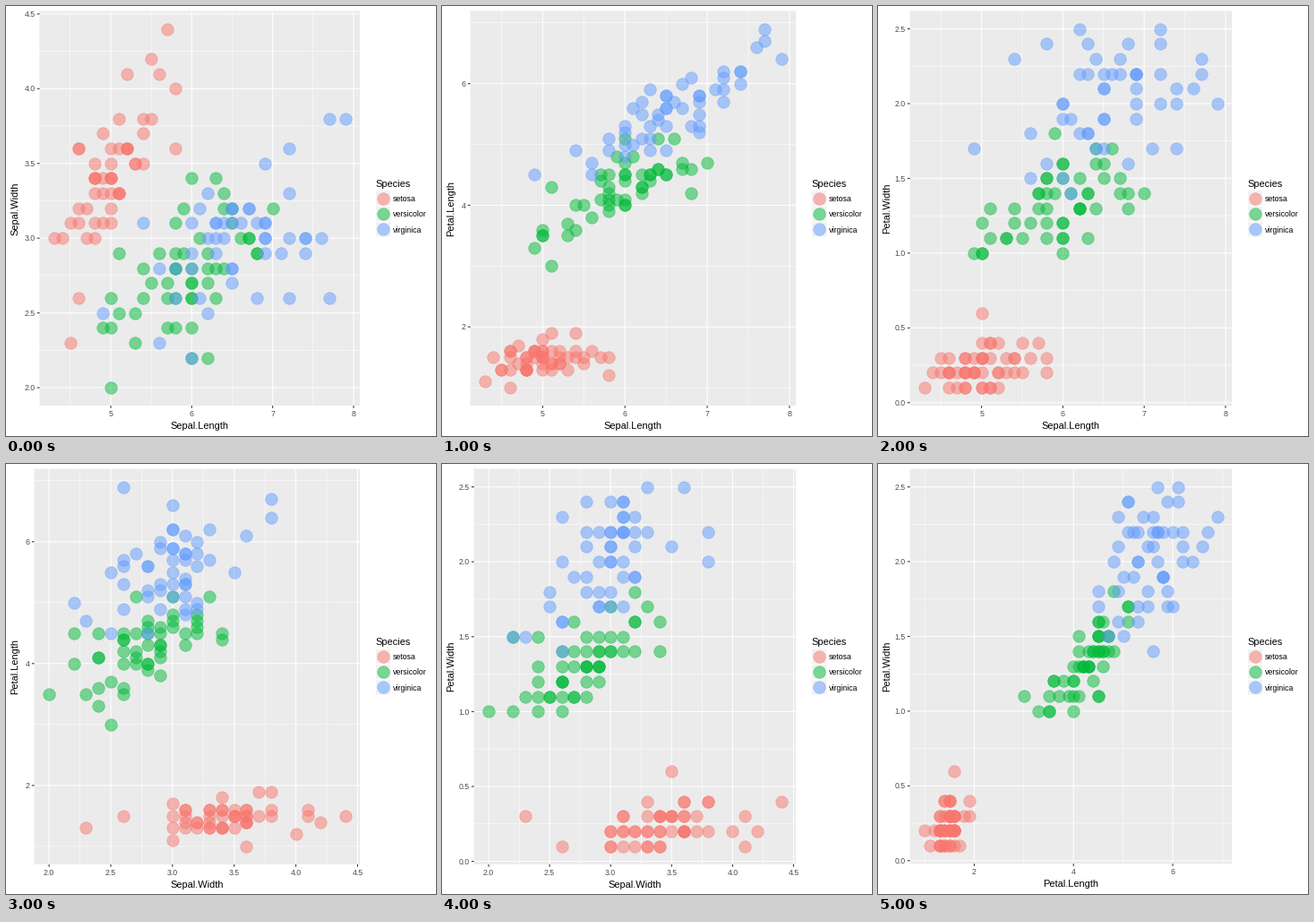
Write a matplotlib script that moves like this. It is 480x480 px and loops after 6 s.

```python
import itertools

import matplotlib.pyplot as plt
import numpy as np
from matplotlib.animation import FuncAnimation
from matplotlib.patches import Rectangle

plt.rcParams["font.family"] = "Liberation Sans"

SIZE, DPI = 480, 72
TOP, RIGHT = 5.5, 395.2
MAJOR, MINOR = 1.07, 0.54

# name, data minimum, data maximum, tick step
VARS = [
    ("Sepal.Length", 4.3, 7.9, 1),
    ("Sepal.Width", 2.0, 4.4, 0.5),
    ("Petal.Length", 1.0, 6.9, 2),
    ("Petal.Width", 0.1, 2.5, 0.5),
]
LEFT = {1: 37.5, 2: 31.6, 3: 35.7}  # panel edge, by the variable on y

# Mean, spread and correlations of each species, with its outlying flowers.
SPECIES = {
    "setosa": dict(
        color="#F8766D",
        mean=[5.006, 3.428, 1.462, 0.246],
        sd=[0.352, 0.379, 0.174, 0.105],
        corr=[0.743, 0.267, 0.278, 0.178, 0.233, 0.332],
        outer=[(5.7, 4.4, 1.5, 0.4), (5.5, 4.2, 1.4, 0.2), (5.2, 4.1, 1.5, 0.1),
               (5.8, 4.0, 1.2, 0.2), (4.5, 2.3, 1.3, 0.3), (4.3, 3.0, 1.1, 0.1),
               (4.6, 3.6, 1.0, 0.2), (5.0, 3.5, 1.6, 0.6), (5.1, 3.8, 1.9, 0.4)],
    ),
    "versicolor": dict(
        color="#00BA38",
        mean=[5.936, 2.770, 4.260, 1.326],
        sd=[0.516, 0.314, 0.470, 0.198],
        corr=[0.526, 0.754, 0.546, 0.561, 0.664, 0.787],
        outer=[(5.0, 2.0, 3.5, 1.0), (6.0, 2.2, 4.0, 1.0), (6.2, 2.2, 4.5, 1.5),
               (5.1, 2.5, 3.0, 1.1), (7.0, 3.2, 4.7, 1.4), (6.0, 3.4, 4.5, 1.6),
               (4.9, 2.4, 3.3, 1.0), (5.9, 3.2, 4.8, 1.8), (6.0, 2.7, 5.1, 1.6)],
    ),
    "virginica": dict(
        color="#619CFF",
        mean=[6.588, 2.974, 5.552, 2.026],
        sd=[0.636, 0.322, 0.552, 0.275],
        corr=[0.457, 0.864, 0.281, 0.401, 0.538, 0.322],
        outer=[(4.9, 2.5, 4.5, 1.7), (7.7, 3.8, 6.7, 2.2), (7.9, 3.8, 6.4, 2.0),
               (7.2, 3.6, 6.1, 2.5), (7.7, 2.6, 6.9, 2.3), (6.0, 2.2, 5.0, 1.5),
               (7.6, 3.0, 6.6, 2.1), (6.1, 2.6, 5.6, 1.4), (5.8, 2.8, 5.1, 2.4)],
    ),
}


def grow(rng, mean, sd, corr, outer, n=50, **_):
    """Fill up the outliers so that all n flowers have the given statistics."""
    mean, sd, outer = np.array(mean), np.array(sd), np.array(outer)
    cor = np.eye(4)
    for (a, b), c in zip(itertools.combinations(range(4), 2), corr):
        cor[a, b] = cor[b, a] = c
    cov = cor * np.outer(sd, sd)

    m = n - len(outer)
    center = (n * mean - outer.sum(axis=0)) / m
    scatter = ((n - 1) * cov + n * np.outer(mean, mean)
               - outer.T @ outer - m * np.outer(center, center))
    val, vec = np.linalg.eigh(scatter / m)
    root = vec * np.sqrt(np.maximum(val, 1e-4))

    z = rng.standard_normal((m, 4))
    z -= z.mean(axis=0)
    z = np.linalg.qr(z)[0] * np.sqrt(m)
    rest = np.clip(center + z @ root.T, outer.min(axis=0), outer.max(axis=0))
    return np.vstack([outer, rest.round(1)])


rng = np.random.default_rng(4)
flowers = {name: grow(rng, **spec) for name, spec in SPECIES.items()}
pairs = list(itertools.combinations(range(4), 2))

fig = plt.figure(figsize=(SIZE / DPI, SIZE / DPI), dpi=DPI, facecolor="white")
ax = fig.add_axes([0, 0, 1, 1])


def scale(var, start, end):
    """Map a variable to pixels, with 5% of room on both sides."""
    _, lo, hi, _ = VARS[var]
    pad = 0.05 * (hi - lo)
    return lambda v: start + (v - lo + pad) / (hi - lo + 2 * pad) * (end - start)


def breaks(var, offset=0.0):
    _, lo, hi, step = VARS[var]
    pad = 0.05 * (hi - lo)
    ticks = (np.arange(20) + offset) * step
    return [t for t in ticks if lo - pad <= t <= hi + pad]


def label(var, t):
    return f"{t:.1f}" if VARS[var][3] < 1 else f"{t:.0f}"


def line(xs, ys, color, width, z):
    ax.plot(xs, ys, color=color, lw=width, zorder=z, snap=False,
            solid_capstyle="butt")


def box(x, y, w, h, **style):
    ax.add_patch(Rectangle((x, y), w, h, snap=False, zorder=0, **style))


def text(x, y, s, size, color="black", ha="left", angle=0):
    ax.text(x, y, s, size=size, color=color, ha=ha, va="baseline",
            rotation=angle, rotation_mode="anchor")


def dots(x, y, color, z):
    ax.scatter(x, y, s=13.5 ** 2, c=color, edgecolors=color, lw=0.71,
               alpha=0.5, zorder=z)


def legend():
    text(412, 202, "Species", 11)
    for k, (name, spec) in enumerate(SPECIES.items()):
        y = 214.8 + 17.28 * k
        box(412.4, y - 8.64, 17.28, 17.28, fc="#F2F2F2", ec="white", lw=MAJOR)
        dots([421], [y], spec["color"], 5)
        text(432, y + 3.2, name, 8.8)


def draw(i):
    vx, vy = pairs[i]
    left = LEFT[vy]
    drop = 1 if vx == 1 else 0
    bottom = 446.1 + 0.8 * drop
    px, py = scale(vx, left, RIGHT), scale(vy, bottom, TOP)

    ax.cla()
    ax.set(xlim=(0, SIZE), ylim=(SIZE, 0))
    ax.axis("off")
    box(left, TOP, RIGHT - left, bottom - TOP, fc="#EBEBEB", ec="none")

    for offset, width in ((0.5, MINOR), (0, MAJOR)):
        for t in breaks(vy, offset):
            line([left, RIGHT], [py(t)] * 2, "white", width, 1)
        for t in breaks(vx, offset):
            line([px(t)] * 2, [TOP, bottom], "white", width, 1)

    for t in breaks(vx):
        line([px(t)] * 2, [bottom, bottom + 2.75], "#333333", MAJOR, 2)
        text(px(t), 458 + drop, label(vx, t), 8.8, "#4D4D4D", "center")
    for t in breaks(vy):
        line([left - 2.75, left], [py(t)] * 2, "#333333", MAJOR, 2)
        text(left - 4.95, py(t) + 3.15, label(vy, t), 8.8, "#4D4D4D", "right")

    text((left + RIGHT) / 2, 472 + drop, VARS[vx][0], 11, ha="center")
    text(13, (TOP + bottom) / 2, VARS[vy][0], 11, ha="center", angle=90)

    for name, data in flowers.items():
        dots(px(data[:, vx]), py(data[:, vy]), SPECIES[name]["color"], 4)
    legend()
    return []


anim = FuncAnimation(fig, draw, frames=len(pairs), interval=1000,
                     init_func=lambda: [], repeat=True, repeat_delay=0)
plt.show()
```
